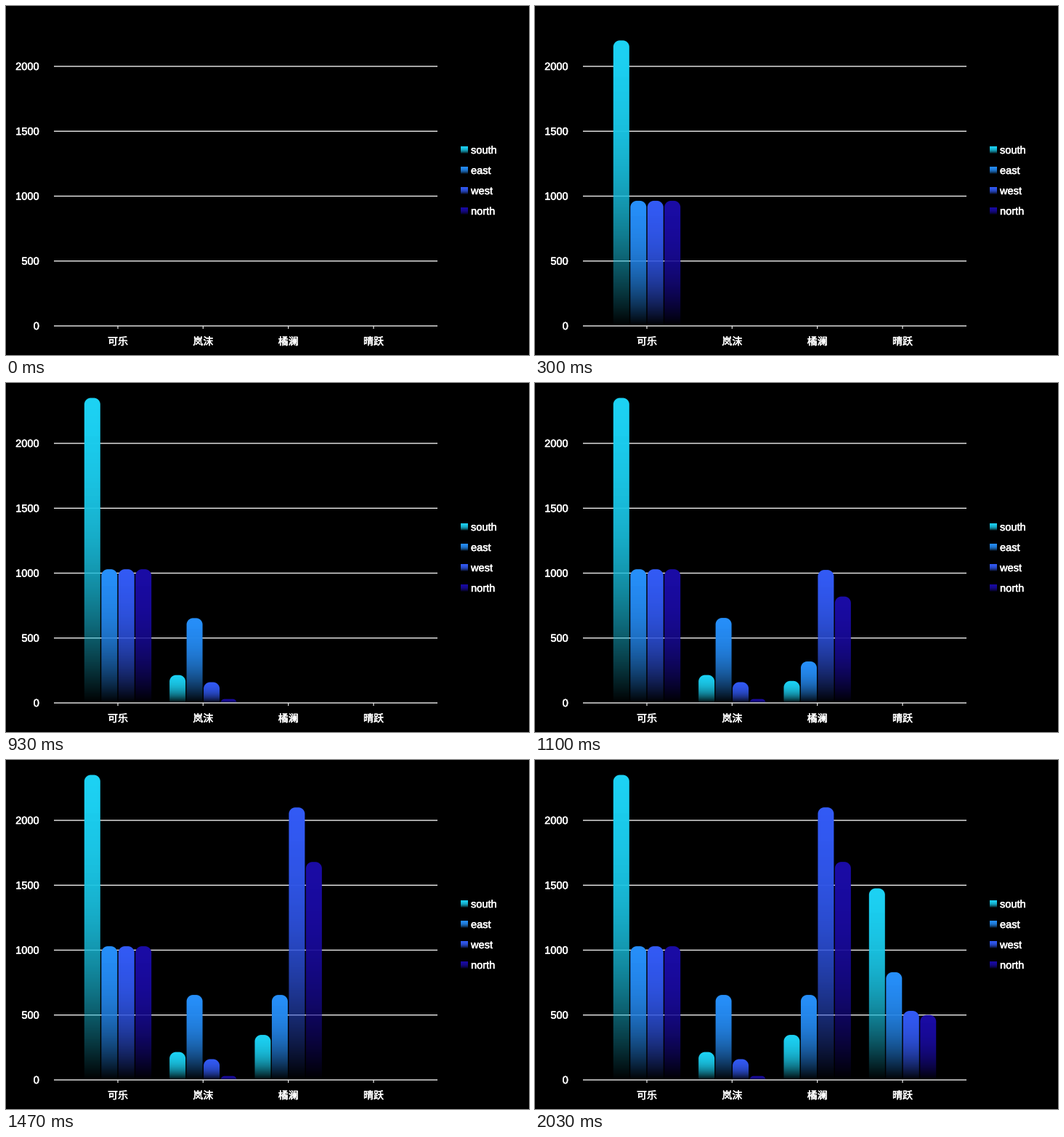
A matplotlib script for the animation above (2060 ms loop, 720x480 px).

```python
import numpy as np
import matplotlib.pyplot as plt
from matplotlib import patheffects
from matplotlib.animation import FuncAnimation
from matplotlib.colors import to_rgb

W, H, DPI = 720, 480, 100
TICK_MS, LOOP_MS = 10, 2060
GROW_STEPS = 15          # half a second at 30 steps per second

LEFT, RIGHT, BASE = 66, 594, 440
PX_PER_UNIT = 357 / 2000
BAND = 528 / 4.5
BAR_W, PITCH, RADIUS = 22, BAND * 0.8 / 4, 9
X0, X1 = 100, 560        # columns covered by the bar layer

SERIES = {"south": "#1cd2f4", "east": "#268ffa",
          "west": "#325af5", "north": "#1a0ba5"}
SALES = {"可乐": (2350, 1030, 1030, 1030),
         "岚沫": (215, 655, 160, 30),
         "橘澜": (347, 655, 2100, 1680),
         "晴跃": (1476, 830, 532, 500)}
COLORS = [np.array(to_rgb(c)) for c in SERIES.values()]
CENTERS = [LEFT + BAND * (0.75 + i) for i in range(len(SALES))]


def px(n):
    """Pixels to points."""
    return n * 72 / DPI


def fade(color, t):
    """Column of RGBA values, solid at t=0 and clear at t=1."""
    t = np.clip(t, 0, 1)[:, None]
    return np.hstack([color * (1 - 0.2 * t), 1 - t ** 3])


def cubic_out(t):
    return 1 - (1 - min(max(t, 0), 1)) ** 3


def paint_bar(layer, cx, height, color):
    """Add one round-topped bar with smooth edges to the layer."""
    top = BASE - height
    r = min(RADIUS, height)
    x_from, y_from = int(cx - BAR_W / 2) - 1, max(int(top) - 1, 0)
    x = np.arange(x_from, x_from + BAR_W + 3) + 0.5
    y = np.arange(y_from, BASE) + 0.5
    dx = np.maximum(abs(x - cx) - (BAR_W / 2 - r), 0)
    dy = np.maximum(top + r - y, 0)
    cover = np.clip(r + 0.5 - np.hypot(dx[None, :], dy[:, None]), 0, 1)

    rgba = np.repeat(fade(color, (y - top) / height)[:, None], len(x), axis=1)
    rgba[..., 3] *= cover
    area = layer[y_from:BASE, x_from - X0:x_from - X0 + len(x)]
    inside = cover > 0
    area[inside] = np.round(rgba[inside] * 255)


def bar_layer(step):
    layer = np.zeros((BASE, X1 - X0, 4), np.uint8)
    for group, (cx, values) in enumerate(zip(CENTERS, SALES.values())):
        grown = cubic_out(step / GROW_STEPS - group)
        if grown <= 0:
            continue
        for i, (value, color) in enumerate(zip(values, COLORS)):
            paint_bar(layer, cx + (i - 1.5) * PITCH,
                      value * PX_PER_UNIT * grown, color)
    return layer


fig = plt.figure(figsize=(W / DPI, H / DPI), dpi=DPI, facecolor="black")
ax = fig.add_axes([0, 0, 1, 1])
ax.axis("off")


def line(xs, ys, width, z):
    ax.plot(xs, ys, color="#ececec", lw=px(width), zorder=z,
            solid_capstyle="butt", snap=False)


def label(x, y, text, size=14.6, font="Liberation Sans", ha="left"):
    ax.text(x, y, text, color="white", fontsize=px(size), family=font,
            ha=ha, va="baseline", zorder=5,
            path_effects=[patheffects.withStroke(linewidth=px(0.5),
                                                 foreground="white")])


def picture(data, extent, z):
    return ax.imshow(data, extent=extent, aspect="auto",
                     interpolation="nearest", zorder=z)


for value in range(0, 2001, 500):
    y = BASE - value * PX_PER_UNIT
    line([LEFT, RIGHT], [y, y], 1.4, 3 if value == 0 else 1)
    label(46, y + 5, str(value), ha="right")

for cx, name in zip(CENTERS, SALES):
    line([cx, cx], [BASE, BASE + 4], 1.2, 3)
    label(cx, 466, name, 14, "Noto Sans CJK JP", "center")

for i, (name, color) in enumerate(zip(SERIES, COLORS)):
    y = 193 + 28 * i
    swatch = fade(color, (np.arange(10) + 0.5) / 10)[:, None]
    picture(swatch, (626, 636, y + 10, y), 2)
    label(640, y + 10, name)

bars = picture(bar_layer(0), (X0, X1, BASE, 0), 2)
ax.set_xlim(0, W)
ax.set_ylim(H, 0)


def update(tick):
    bars.set_data(bar_layer((3 * tick + 1) // 10))
    return [bars]


anim = FuncAnimation(fig, update, frames=LOOP_MS // TICK_MS,
                     interval=TICK_MS, repeat=True, repeat_delay=0,
                     blit=False)
plt.show()
```
